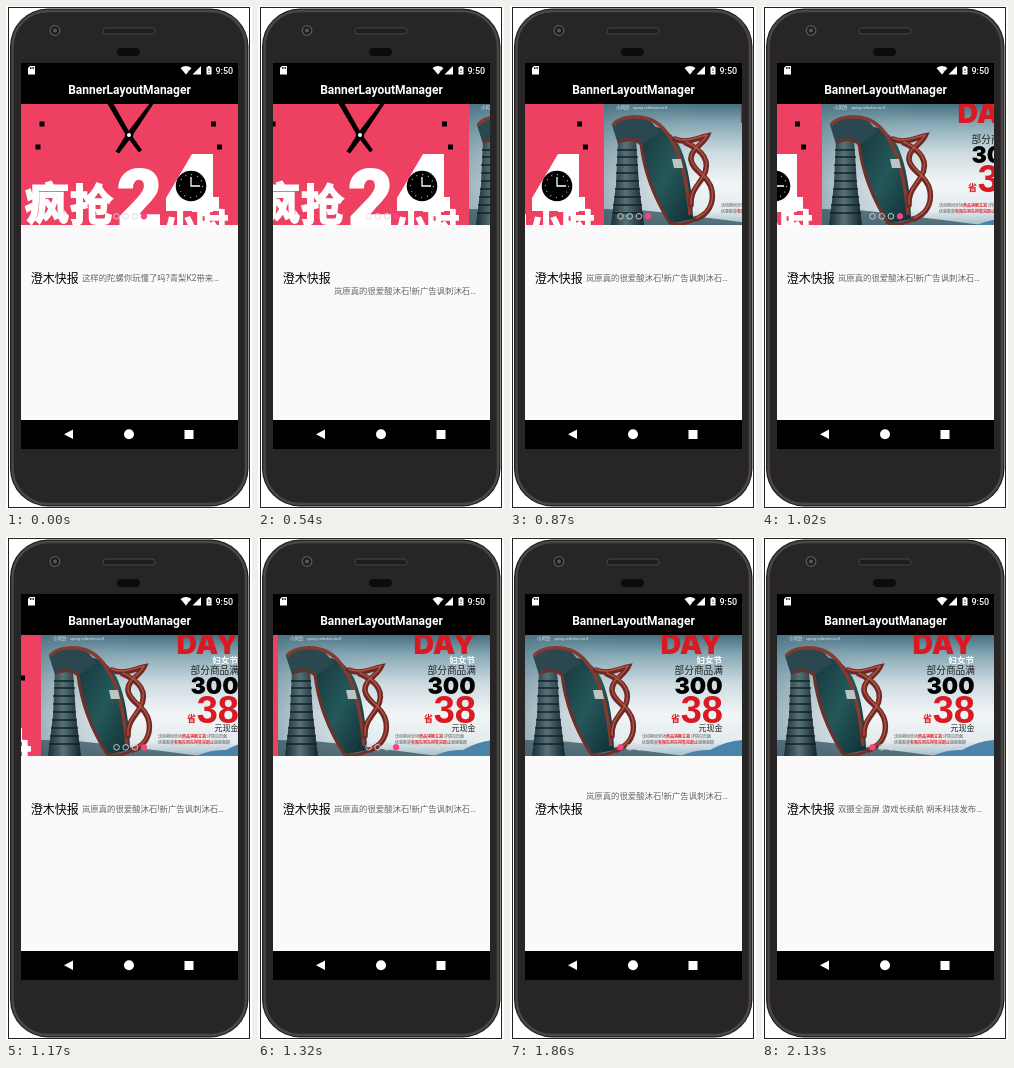
Animation of 246x503 px, one loop 2220 ms. Source, as an HTML page:

```html
<!DOCTYPE html>
<html lang="zh-CN">
<head>
<meta charset="utf-8">
<title>BannerLayoutManager</title>
<style>
html, body { margin: 0; width: 100%; height: 100%; overflow: hidden; background: #fff; }
svg { display: block; width: 246px; height: 503px; }
text { font-family: Roboto, "Noto Sans CJK SC", "Noto Sans CJK JP", sans-serif; white-space: pre; }
.title { font-size: 12px; font-weight: 700; fill: #fff; text-anchor: middle; }
.time { font-size: 9px; font-weight: 500; fill: #fff; }
.label { font-size: 12px; font-weight: 500; fill: #000; }
.news text { font-size: 8.4px; fill: #666; }
.slogan text { fill: #fff; stroke: #fff; stroke-width: 1.8; font-weight: 900; }
.heavy { font-family: Inter, "Liberation Sans", sans-serif; font-weight: 900; }
.end { text-anchor: end; }
.dots circle { fill: none; stroke: #ddd6da; stroke-width: .9; }
.dots .on { fill: #ff4081; stroke: #ff4081; }
</style>
</head>
<body>
<svg viewBox="0 0 246 503">
  <defs>
    <clipPath id="bannerBox"><rect x="15" y="98" width="217" height="121"/></clipPath>
    <clipPath id="newsBox"><rect x="76" y="255" width="146" height="35"/></clipPath>
    <linearGradient id="sky" x2="0" y2="1">
      <stop offset="0" stop-color="#456f80"/>
      <stop offset=".16" stop-color="#86a8b4"/>
      <stop offset=".4" stop-color="#cddbe0"/>
      <stop offset=".65" stop-color="#f1f5f6"/>
      <stop offset=".88" stop-color="#e4ecef"/>
      <stop offset="1" stop-color="#a3bec9"/>
    </linearGradient>
    <linearGradient id="shade">
      <stop offset="0" stop-color="#4f7787" stop-opacity=".5"/>
      <stop offset=".45" stop-color="#8fadb8" stop-opacity="0"/>
    </linearGradient>
    <linearGradient id="tower">
      <stop offset="0" stop-color="#1a2d33"/>
      <stop offset=".45" stop-color="#567278"/>
      <stop offset="1" stop-color="#14252b"/>
    </linearGradient>
    <linearGradient id="sole" x2="1" y2="1">
      <stop offset="0" stop-color="#17363c"/>
      <stop offset=".5" stop-color="#24585a"/>
      <stop offset="1" stop-color="#102d33"/>
    </linearGradient>
  </defs>

  <!-- phone -->
  <rect x="2.5" y="1.5" width="241" height="500" fill="#fff" stroke="#222"/>
  <rect x="4" y="2.5" width="238.500" height="498" rx="38" fill="#1f1d1d"/>
  <rect x="6.500" y="5" width="233.500" height="493" rx="35.500" fill="#282526" stroke="#4a4745" stroke-width="2.500"/>
  <rect x="97" y="22" width="52" height="6" rx="3" fill="#1f1d1e" stroke="#474546"/>
  <rect x="111" y="42" width="23" height="8" rx="4" fill="#0c0c0c"/>
  <circle cx="49" cy="24.500" r="4.800" fill="#1b1c1f" stroke="#5a5858" stroke-width="1.300"/>
  <circle cx="49" cy="24.500" r="2" fill="#55585c"/>

  <!-- screen -->
  <rect x="15" y="57" width="217" height="386"/>
  <rect x="15" y="98" width="217" height="316" fill="#fafafa"/>
  <g fill="#fff">
    <path d="M24 60h5v8.500h-7v-6.500z"/>
    <path d="M174.500 62q5.500-4 11 0l-5.500 6.500z"/>
    <path d="M195 60v8.500h-8.500z"/>
    <path d="M200.500 61h1.300v-1h2.400v1h1.300v7.500h-5z"/>
    <path d="M67 423.500v9.500l-9-4.750z"/>
    <circle cx="123" cy="428.300" r="5"/>
    <rect x="178.500" y="424" width="9" height="9"/>
  </g>
  <path d="M24.500 61v2m1.500-2v2m1.500-2v2M182 64.500l4 4m0-4l-4 4M203 62.500v2.500m0 1v1" stroke="#000" stroke-width=".8"/>
  <text class="time" x="209.500" y="67.500">9:50</text>
  <text class="title" x="123.500" y="88.300">BannerLayoutManager</text>

  <!-- banner -->
  <g clip-path="url(#bannerBox)">
    <g id="track">
      <g>
        <rect x="15" y="98" width="217" height="121" fill="#ee4060"/>
        <path d="M33.500 115.500h5v5h-5zM29.500 138.500h5v5h-5zM205 115.500h5v5h-5zM211 138.500h5v5h-5z"/>
        <path d="M101 97h6L124 127l12 17-3 2.500L121 131zM144 97h4L125.500 131 113 147.500l-3.500-2L121 127z"/>
        <circle cx="123" cy="129" r="4.300"/>
        <circle cx="123" cy="129" r="2" fill="#fff"/>
        <g class="slogan">
          <text x="19" y="214" font-size="44">疯</text>
          <text x="64" y="215" font-size="43">抢</text>
          <text x="111" y="219" font-size="78">2</text>
          <path d="M186 148h21v43h6v14h-6v14h-21v-14h-26v-13z" fill="#fff"/>
          <path d="M158 206h68v13h-68z" fill="#ee4060"/>
          <text x="158" y="231" font-size="32">小时</text>
        </g>
        <circle cx="185" cy="180" r="15.300"/>
        <circle cx="185" cy="180" r="11.500" fill="none" stroke="#fff" stroke-width="1.200" stroke-dasharray=".7 5.321"/>
        <path d="M185 171v9h9" fill="none" stroke="#fff" stroke-width="1.300"/>
      </g>

      <g transform="translate(217)">
        <rect x="15" y="98" width="217" height="121" fill="url(#sky)"/>
        <rect x="15" y="98" width="217" height="121" fill="url(#shade)"/>
        <path d="M15 203q40 0 80 6 50 6 80 10H15z" fill="#34535e" opacity=".75"/>
        <path d="M170 219q16-7 30-6 16-9 32-10v16z" fill="#4a84aa"/>
        <text x="27" y="103" font-size="4.500" fill="#e6eef0">小风铃</text>
        <text x="44" y="102.500" font-size="3.600" fill="#e6eef0">spring collection no.8</text>

        <path d="M29 134h18l3 45 5 40H22l5-40z" fill="url(#tower)"/>
        <path d="M28 144h20M28 151h21M27 159h22M27 167h22M27 175h23M26 183h25M25 191h27M24 199h29M23 207h31" stroke="#10222a" stroke-width="1.600"/>
        <path d="M54 124c14-8 28 0 37 17 9 20 12 45 13 72l-24 5c-14-24-27-50-28-82z" fill="url(#sole)"/>
        <path d="M23 119c5-9 22-11 36-7l12 14-18 12c-8-5-17-3-24 0z" fill="#2b4850"/>
        <path d="M24 119c6-9 24-10 36-6 20 7 36 36 41 96" fill="none" stroke="#86392f" stroke-width="3.500"/>
        <path d="M29 136c9-4 17-3 23 2 3 26 12 52 29 79 9 3 20 0 28-5" fill="none" stroke="#6f3029" stroke-width="3"/>
        <path d="M83 153h9l2 9h-9z" fill="#b9c6c4"/>
        <g fill="none" stroke-linecap="round">
          <g stroke="#6c2a27" stroke-width="5.500">
            <path d="M86 133c11 5 22-1 32-3-4 9-17 13-16 24 2 12 18 15 21 31 2 13-4 23-16 28"/>
            <path d="M97 137c16 7 26 18 17 34-6 10-13 15-12 28"/>
          </g>
          <g stroke="#b4513f" stroke-width="1.500">
            <path d="M86 132c11 5 22-1 32-3-4 9-17 13-16 24 2 12 18 15 21 31 2 13-4 23-16 28"/>
            <path d="M97 136c16 7 26 18 17 34-6 10-13 15-12 28"/>
          </g>
        </g>

        <text class="heavy" x="150.500" y="117" font-size="28.500" fill="#da1a22">DAY</text>
        <text class="end" x="212" y="126" font-size="8.500" font-weight="700" fill="#fff">妇女节</text>
        <text class="end" x="213" y="137" font-size="9.700" font-weight="500" fill="#222">部分商品满</text>
        <text class="heavy end" x="212.500" y="157" font-size="23">300</text>
        <text x="161" y="185" font-size="9" font-weight="700" fill="#da1a22">省</text>
        <text class="end" x="213" y="185.500" font-size="38" font-weight="700" style="font-family:'Liberation Sans',sans-serif" fill="#da1a22">38</text>
        <text class="end" x="212.500" y="193.500" font-size="8" fill="#222">元现金</text>
        <g font-size="4" fill="#555">
          <text x="132" y="200.500">活动期间全场<tspan fill="#e0262c" font-weight="700">商品满额立减</tspan> 详情见页面</text>
          <text x="132" y="206.500">优惠数量<tspan fill="#e0262c" font-weight="700">有限先到先得售完即止</tspan>谢谢惠顾</text>
        </g>
      </g>
    </g>
    <g class="dots" id="dots">
      <circle cx="110.500" cy="210.300" r="2.800"/>
      <circle cx="119.700" cy="210.300" r="2.800"/>
      <circle cx="128.900" cy="210.300" r="2.800"/>
      <circle cx="138" cy="210.300" r="2.800"/>
    </g>
  </g>

  <!-- news ticker -->
  <text class="label" x="24.800" y="276.500">澄木快报</text>
  <g clip-path="url(#newsBox)">
    <g class="news" id="news">
      <text x="76" y="275.300">这样的陀螺你玩懂了吗?青梨K2带来…</text>
      <text x="76" y="310.300">岚原真的很爱酸沐石!新广告讽刺沐石…</text>
      <text x="76" y="345.300">双摄全面屏 游戏长续航 朔禾科技发布…</text>
    </g>
  </g>
</svg>
<script>
const LOOP = 2220, STEP = 30;
const PAGE = 217, ROW = 35;
const byId = id => document.getElementById(id);
const track = byId('track'), news = byId('news'), dots = [...byId('dots').children];

// Constant speed (px/ms) at first, then a quadratic slow-down of length `time` that stops at `end`.
function glide(t, { dist, start, speed, end, time }) {
  const steady = Math.max(0, t - start) * speed;
  const left = Math.max(0, end - t) / time;
  return Math.min(steady, dist * (1 - left * left));
}

const slide = { dist: PAGE, start: 502, speed: 0.56, end: 1473, time: 1000 };
const roll = { dist: ROW, start: 413, speed: 0.28, end: 750, time: 344 };
const ROLL_GAP = 1380;

function draw(now) {
  const t = Math.floor((now % LOOP + 0.01) / STEP) * STEP;
  const x = Math.round(glide(t, slide));
  const y = glide(t, roll) + Math.max(0, glide(t - ROLL_GAP, roll));
  track.setAttribute('transform', `translate(${-x})`);
  news.setAttribute('transform', `translate(0 ${-y.toFixed(2)})`);
  const page = t < 1470 ? 3 : 0;
  dots.forEach((dot, i) => dot.classList.toggle('on', i === page));
}

// Negative progress before a roll begins means it is still at rest.
const rest = glide;
glide = (t, move) => t <= move.start ? 0 : rest(t, move);

const start = performance.now();
function tick() {
  draw(performance.now() - start);
  requestAnimationFrame(tick);
}
tick();
</script>
</body>
</html>
```
